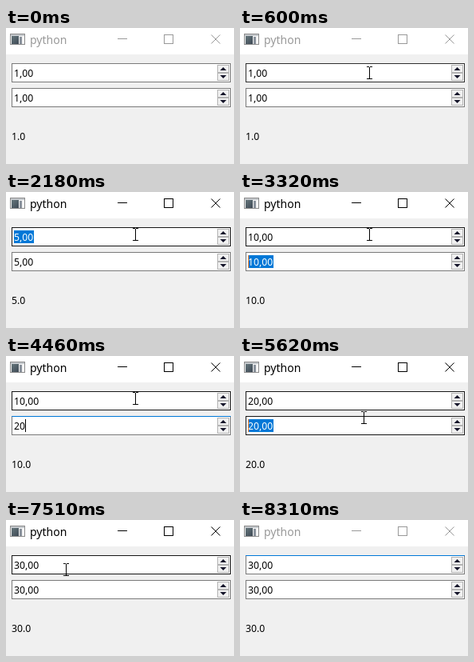
An HTML page with a canvas that plays this animation: 286x170 px, repeating every 8.34 s.

```html
<!DOCTYPE html>
<html lang="en">
<head>
<meta charset="utf-8">
<title>Spin boxes</title>
<style>
  html, body { margin: 0; width: 100%; height: 100%; overflow: hidden; background: #f0f0f0; }
  canvas { display: block; width: 286px; height: 170px; }
</style>
</head>
<body>
<canvas id="stage" width="286" height="170"></canvas>
<script>
const ctx = document.getElementById('stage').getContext('2d');
const LOOP = 8340;
const FONT = '"Noto Sans", "Open Sans", sans-serif';
const BLUE = [0, 120, 215], GRAY = [122, 122, 122], DARK = [23, 23, 23];
const BOX_TOPS = [44, 75];

// Each entry changes part of the state: texts a and b, label, caret x, focus, selection.
const events = [
  [0, { a: '1,00', b: '1,00', label: '1.0', active: false, focus: -1, selected: false, caret: 0 }],
  [800, { active: true }],
  [880, { focus: 0, caret: 35 }],
  [1110, { selected: true, caret: 0 }],
  [1980, { caret: 10 }], [2180, { caret: 0 }], [2380, { caret: 10 }],
  [2580, { a: '1', label: '1.0', selected: false, caret: 17 }],
  [2630, { b: '1,00' }],
  [2860, { a: '10', b: '10,00', caret: 24 }],
  [2960, { label: '10.0' }],
  [3190, { a: '10,00', focus: 1, selected: true, caret: 10 }],
  [3780, { caret: 0 }], [3980, { caret: 10 }],
  [4180, { b: '2', selected: false, caret: 0 }],
  [4210, { caret: 17 }],
  [4460, { b: '20', caret: 24 }],
  [4690, { caret: 0 }], [4870, { caret: 24 }],
  [5070, { b: '20,00', selected: true, caret: 10 }],
  [5150, { a: '20,00' }],
  [5230, { label: '20.0' }],
  [6310, { caret: 0 }], [6490, { caret: 10 }],
  [6690, { b: '3', selected: false, caret: 0 }],
  [6740, { caret: 17 }],
  [6920, { b: '30', caret: 24 }],
  [6980, { caret: 0 }],
  [7280, { a: '30,00', b: '30,00', label: '30.0', focus: 0, caret: 42 }],
  [7510, { caret: 0 }], [7710, { caret: 42 }], [7910, { caret: 0 }],
  [8250, { active: false }]
];

const pointerPath = [
  [200, 168, 107], [420, 165, 82], [620, 162, 53], [5400, 162, 53], [5620, 155, 77],
  [5800, 122, 84], [6080, 88, 85], [6900, 88, 85], [7010, 78, 64], [7200, 75, 62],
  [7690, 75, 62], [7850, 78, 82], [8000, 86, 115], [8180, 98, 172]
];

// Border keys: time, frame colour, top edge colour.
const borders = [
  [[540, ...GRAY, ...GRAY], [620, ...DARK, ...DARK], [5620, ...DARK, ...DARK],
   [5920, ...GRAY, ...GRAY], [6970, ...GRAY, ...GRAY], [7005, ...DARK, ...DARK],
   [7760, ...DARK, ...DARK], [8060, ...GRAY, ...BLUE]],
  [[440, ...GRAY, ...GRAY], [3330, ...GRAY, ...GRAY], [3580, ...GRAY, ...BLUE],
   [5580, ...GRAY, ...BLUE], [5615, ...DARK, ...DARK], [7010, ...DARK, ...DARK],
   [7450, ...GRAY, ...GRAY], [7810, ...GRAY, ...GRAY], [7860, ...DARK, ...DARK],
   [7940, ...DARK, ...DARK], [8200, ...GRAY, ...GRAY]]
];

function sample(keys, t) {
  if (t <= keys[0][0]) return keys[0].slice(1);
  const next = keys.findIndex(key => key[0] > t);
  if (next < 0) return keys[keys.length - 1].slice(1);
  const from = keys[next - 1], to = keys[next];
  const p = (t - from[0]) / (to[0] - from[0]);
  return from.slice(1).map((v, i) => v + (to[i + 1] - v) * p);
}

function stateAt(t) {
  const state = {};
  for (const [time, change] of events) if (time <= t) Object.assign(state, change);
  // Wheel run: 1 up to 14, then back down to 5.
  if (t >= 1110 && t < 2580) {
    const step = t < 1420 ? 1 + Math.floor((t - 1110) / 34.4)
      : 10 + Math.min(12, Math.floor((t - 1420) / 40));
    const value = step <= 13 ? 1 + step : 27 - step;
    state.a = state.b = value + ',00';
    state.label = value + '.0';
  }
  return state;
}

const rgb = c => `rgb(${c.map(Math.round).join()})`;

function rect(x, y, w, h, color) {
  ctx.fillStyle = color;
  ctx.fillRect(x, y, w, h);
}

function text(string, x, y, size, color) {
  ctx.font = `${size}px ${FONT}`;
  ctx.fillStyle = color;
  ctx.fillText(string, x, y);
}

function polygon(points, fill, stroke) {
  ctx.beginPath();
  points.forEach(([x, y]) => ctx.lineTo(x, y));
  ctx.closePath();
  ctx.fillStyle = fill;
  ctx.fill();
  if (stroke) {
    ctx.strokeStyle = stroke;
    ctx.stroke();
  }
}

function drawTitleBar(active) {
  const ink = active ? '#000' : '#999';
  rect(0, 0, 286, 33, '#fff');
  rect(5, 7, 19, 14, '#8c8c8c');
  rect(6, 8, 17, 12, '#f4f4f4');
  rect(6, 8, 17, 2, '#c4c8cc');
  const shade = ctx.createLinearGradient(7, 10, 16, 20);
  shade.addColorStop(0, '#66777c');
  shade.addColorStop(1, '#3f4a56');
  rect(7, 10, 9, 10, shade);
  rect(17, 11, 3, 9, '#8a929c');
  text('python', 30, 20, 14, ink);

  ctx.strokeStyle = ink;
  ctx.lineWidth = 1;
  ctx.strokeRect(198.5, 8.5, 11, 11);
  rect(140, 13, 12, 1, ink);
  ctx.beginPath();
  ctx.moveTo(257.5, 8.5);
  ctx.lineTo(268.5, 19.5);
  ctx.moveTo(268.5, 8.5);
  ctx.lineTo(257.5, 19.5);
  ctx.stroke();
}

function drawSpinButton(y, direction) {
  rect(265, y, 15, 10, '#b4b4b4');
  rect(266, y + 1, 13, 8, '#f0f0f0');
  const middle = y + 5;
  polygon([[268.5, middle + 2 * direction], [276.5, middle + 2 * direction],
           [272.5, middle - 2 * direction]], '#15152a');
}

function drawBox(index, string, state, t) {
  const y = BOX_TOPS[index], colors = sample(borders[index], t);
  rect(7, y, 275, 24, rgb(colors.slice(0, 3)));
  rect(7, y, 275, 1, rgb(colors.slice(3)));
  rect(8, y + 1, 273, 22, '#fff');
  drawSpinButton(y + 2, 1);
  drawSpinButton(y + 12, -1);

  const focused = state.focus === index;
  const selected = focused && state.selected;
  if (selected) rect(10, y + 4, string.length * 7 - 3, 16, rgb(BLUE));
  text(string, 10, y + 17, 12.25, selected ? '#fff' : '#000');
  if (focused && state.caret) rect(state.caret, y + 4, 1, 16, selected ? '#ff8728' : '#000');
}

function drawPointer(t) {
  if (t < 200 || t > 8180) return;
  const [x, y] = sample(pointerPath, t).map(Math.round);
  if (BOX_TOPS.some(top => y >= top && y < top + 24)) {
    rect(x, y - 7, 1, 15, '#000');
    for (const end of [y - 8, y + 7]) {
      rect(x - 3, end, 3, 1, '#000');
      rect(x + 1, end, 3, 1, '#000');
    }
  } else {
    const outline = [[0, 0], [0, 16], [4, 12.5], [7, 18], [9, 17], [6.5, 11.5], [11, 11.5]];
    polygon(outline.map(([dx, dy]) => [x + dx + 0.5, y + dy + 0.5]), '#fff', '#000');
  }
}

function draw(t) {
  const state = stateAt(t);
  rect(0, 0, 286, 170, '#f0f0f0');
  drawTitleBar(state.active);
  drawBox(0, state.a, state, t);
  drawBox(1, state.b, state, t);
  text(state.label, 7, 140, 12.25, '#000');
  drawPointer(t);
}

const start = performance.now();
function frame() {
  draw((performance.now() - start) % LOOP);
  requestAnimationFrame(frame);
}
frame();
</script>
</body>
</html>
```
